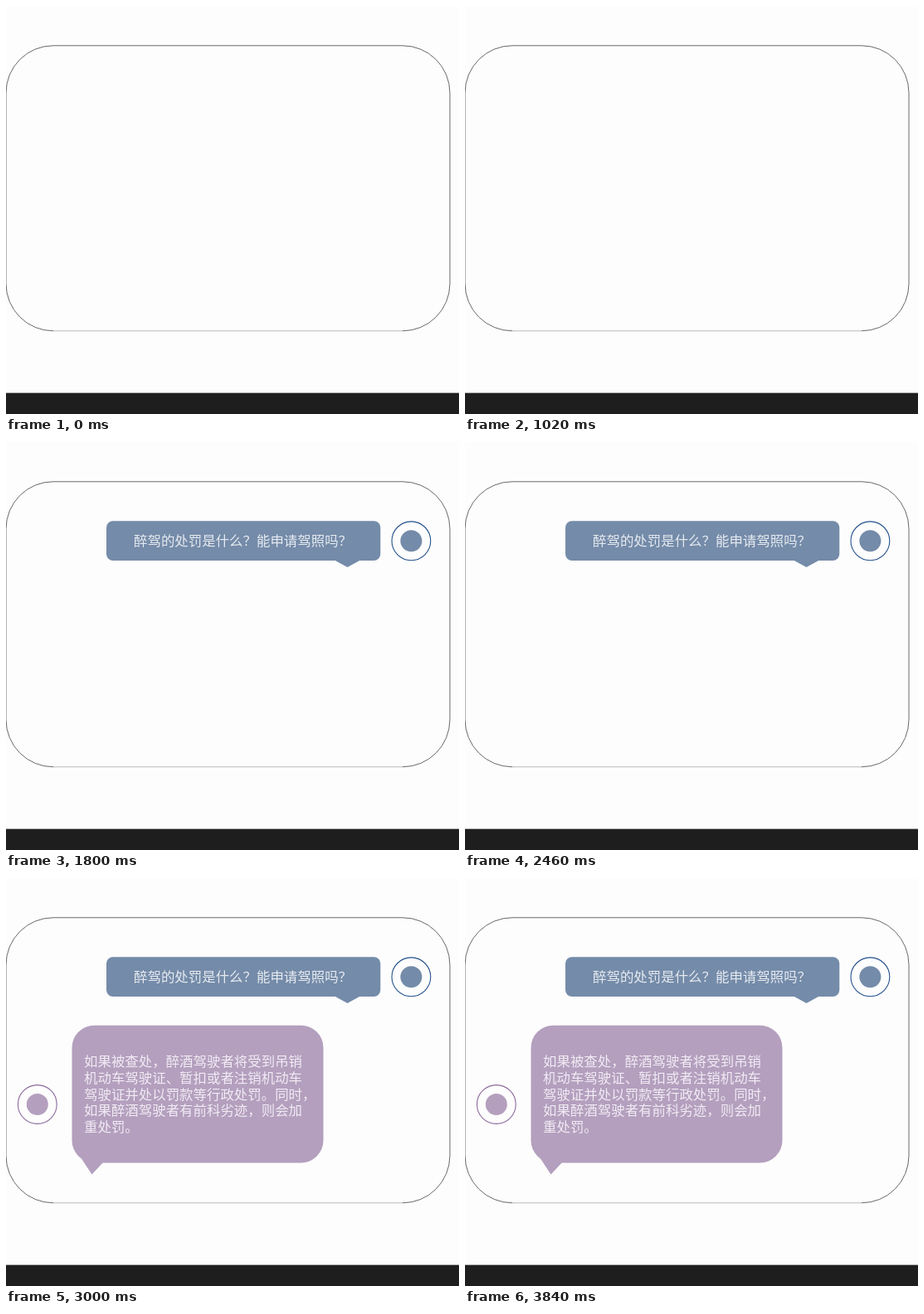
Write an HTML page that moves like this. It is 546x492 px and loops after 4.4 s.

```html
<!DOCTYPE html>
<html lang="zh-CN">
<head>
<meta charset="utf-8">
<title>醉驾问答</title>
<style>
  html, body { margin: 0; width: 100%; height: 100%; overflow: hidden; background: #fdfdfd; }
  svg { display: block; width: 546px; height: 492px; }
  text { font: 300 16.45px "Noto Sans CJK SC", "Noto Sans CJK", sans-serif; }
  .frame { fill: none; stroke: #686868; }
  .ask { fill: #748ba9; animation: ask 4400ms step-end infinite; }
  .ask text { fill: #e6eaf0; }
  .reply { fill: #b49fbe; animation: reply 4400ms step-end infinite; }
  .reply text { fill: #f1ebf4; }
  .ring { fill: #fdfdfd; stroke-width: 1.1; }
  .ask .ring { stroke: #23508c; }
  .reply .ring { stroke: #8a6a9c; }
  @keyframes ask { 0% { opacity: 0 } 38.63%, 100% { opacity: 1 } }
  @keyframes reply { 0% { opacity: 0 } 65.9%, 100% { opacity: 1 } }
</style>
</head>
<body>
<svg viewBox="0 0 546 492">
  <rect width="546" height="492" fill="#fdfdfd"/>
  <rect y="466.6" width="546" height="26" fill="#1e1e1e"/>
  <g class="frame">
    <path d="M57 391.8A57 57 0 0 1 0 334.8V104.8A57 57 0 0 1 57 47.8H478A57 57 0 0 1 535 104.8V334.8A57 57 0 0 1 478 391.8"/>
    <path d="M57 391.8H478" stroke="#b8b8b8"/>
  </g>

  <g class="ask">
    <rect x="121" y="95.2" width="330.3" height="47.8" rx="8"/>
    <path d="M395 142H428L411.5 151Z"/>
    <text x="154" y="124.7">醉驾的处罚是什么？能申请驾照吗？</text>
    <circle class="ring" cx="488.4" cy="119.3" r="23.4"/>
    <circle cx="488.4" cy="119.3" r="13"/>
  </g>

  <g class="reply">
    <rect x="79.5" y="177.7" width="303" height="165.8" rx="27"/>
    <path d="M90 337L103.5 357.5L118 342Z"/>
    <text>
      <tspan x="94" y="227.2">如果被查处，醉酒驾驶者将受到吊销</tspan>
      <tspan x="94" dy="19.75">机动车驾驶证、暂扣或者注销机动车</tspan>
      <tspan x="94" dy="19.75">驾驶证并处以罚款等行政处罚。同时，</tspan>
      <tspan x="94" dy="19.75">如果醉酒驾驶者有前科劣迹，则会加</tspan>
      <tspan x="94" dy="19.75">重处罚。</tspan>
    </text>
    <circle class="ring" cx="37.8" cy="273" r="23.4"/>
    <circle cx="37.8" cy="273" r="13"/>
  </g>
</svg>
</body>
</html>
```
